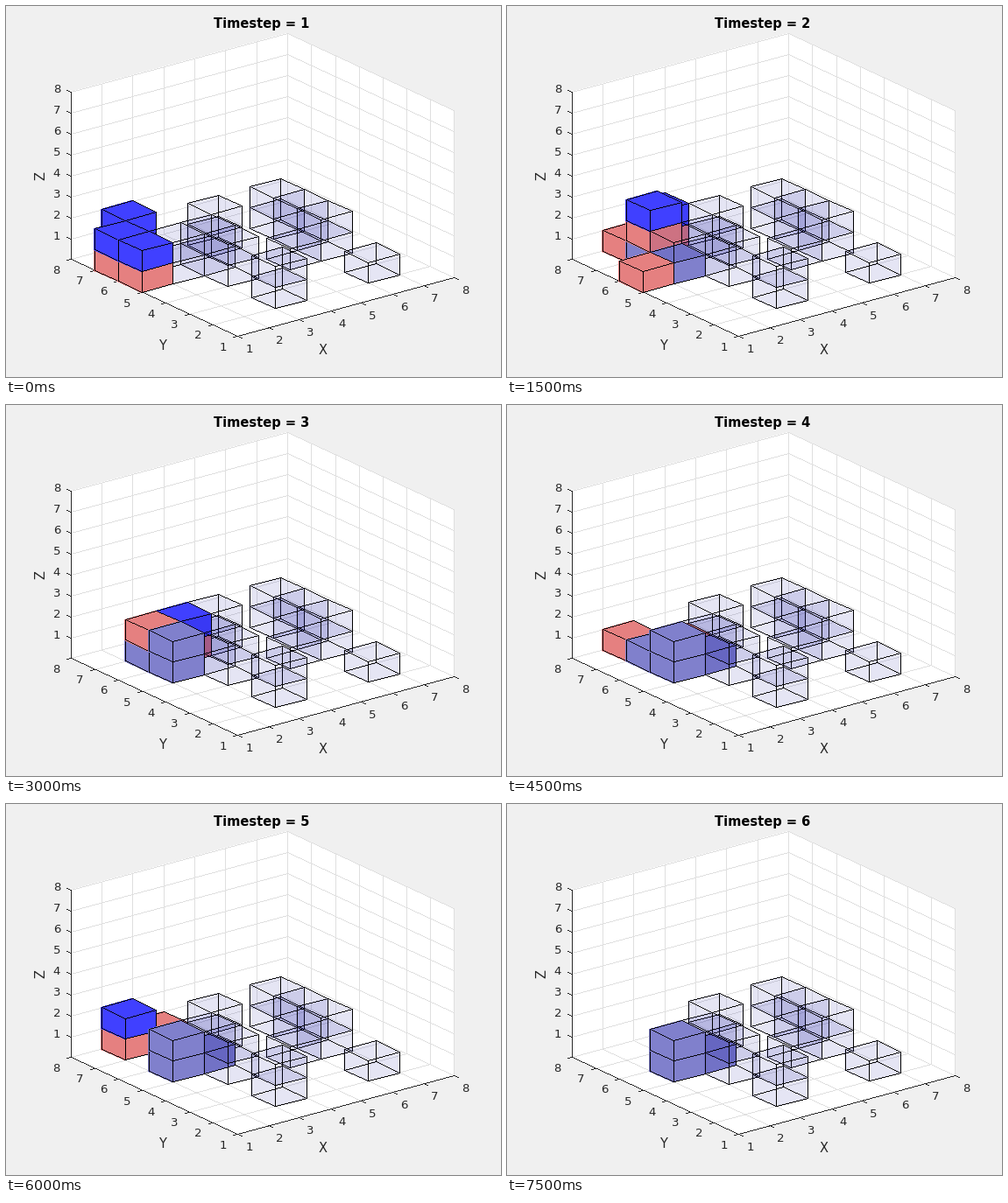
Write a matplotlib script that moves like this. It is 565 px wide and 424 px high and loops after 8 s.

```python
import numpy as np
import matplotlib.pyplot as plt
from matplotlib.animation import FuncAnimation

W, H, DPI = 565, 424, 80
INK = (38 / 255,) * 3
GRID = (223 / 255,) * 3

# Orthographic view, azimuth -37.5, elevation 30, stretched to the axes box
AZ, EL = np.radians(37.5), np.radians(30)
C, S = np.cos(AZ), np.sin(AZ)
LEFT, BOTTOM = 73, 0.89 * H
WIDE = 0.775 * W / (C + S)
TALL = 0.815 * H / ((C + S) * np.sin(EL) + np.cos(EL))
X_VEC = np.array([WIDE * C, -TALL * S * np.sin(EL)]) / 7
Y_VEC = np.array([-WIDE * S, -TALL * C * np.sin(EL)]) / 7
Z_VEC = np.array([0, -TALL * np.cos(EL)]) / 8
ORIGIN = np.array([LEFT + WIDE * S, BOTTOM])


def pixel(x, y, z):
    spot = ORIGIN + (x - 1) * X_VEC + (y - 1) * Y_VEC + z * Z_VEC
    return np.floor(spot) + 0.5


def towers(heights, first_y):
    """Cells of a height map: one word per x from 1, one digit per y."""
    return {(i, j, k)
            for i, row in enumerate(heights.split(), 1)
            for j, height in enumerate(row, first_y)
            for k in range(int(height))}


GOAL = towers("00000 00020 20220 00002 00100 10222", first_y=2)
SETTLED = GOAL | {(2, 6, 0)}
STEPS = [towers(plan, first_y=5) for plan in (
    "220 002 000", "100 131 002", "000 220 020",
    "000 211 110", "000 202 101", "000 200 100")]

RED = (229 / 255, 128 / 255, 128 / 255)
SLATE = (128 / 255, 128 / 255, 204 / 255)
BLUE = (64 / 255, 64 / 255, 1)
GHOST = (0, 0, 0.6, 0.1)


def block_color(cell, blocks):
    """Settled blocks are slate, blocks riding on a loose one are blue."""
    i, j, k = cell
    below = (i, j, k - 1)
    if cell in SETTLED:
        return SLATE
    return BLUE if below in blocks and below not in SETTLED else RED


fig = plt.figure(figsize=(W / DPI, H / DPI), dpi=DPI, facecolor=(240 / 255,) * 3)
ax = fig.add_axes([0, 0, 1, 1])
ax.set_xlim(0, W)
ax.set_ylim(H, 0)
ax.axis("off")


def trace(a, b):
    """Pixel centres along a hard-edged line."""
    count = int(np.abs(b - a).max()) + 1
    return np.floor(np.linspace(a, b, count)) + 0.5


def lines(pairs, color, z):
    dots = np.vstack([trace(a, b) for a, b in pairs])
    return ax.plot(*dots.T, ",", color=color, zorder=z)[0]


def area(points, color, z):
    return ax.fill(*np.array(points).T, facecolor=color, edgecolor="none",
                   lw=0, zorder=z, antialiased=False)[0]


def label(x, y, text, size, color=INK, va="baseline", **kw):
    return ax.text(x, y, text, fontsize=size * 96 / DPI, color=color, ha="center",
                   va=va, family="DejaVu Sans", zorder=900, **kw)


def draw_box():
    area([pixel(1, 8, 8), pixel(8, 8, 8), pixel(8, 1, 8),
          pixel(8, 1, 0), pixel(1, 1, 0), pixel(1, 8, 0)], "white", 0)
    grid = []
    for t in range(1, 9):
        for path in ([(t, 1, 0), (t, 8, 0), (t, 8, 8)],
                     [(1, t, 0), (8, t, 0), (8, t, 8)],
                     [(1, 8, t), (8, 8, t), (8, 1, t)]):
            a, b, c = (pixel(*p) for p in path)
            grid += [(a, b), (b, c)]
    lines(grid, GRID, 1)

    near, far = pixel(1, 1, 0), pixel(1, 8, 0)
    rules = [(near, pixel(8, 1, 0)), (near, far), (far, pixel(1, 8, 8))]
    out_x = -Y_VEC / np.hypot(*Y_VEC) * 5
    out_y = -X_VEC / np.hypot(*X_VEC) * 5
    for t in range(1, 9):
        for spot, tick, shift in (((t, 1, 0), out_x, (14, 18.6)),
                                  ((1, t, 0), out_y, (-16, 16)),
                                  ((1, 8, t), -out_x, (-15.5, 0.3))):
            p = pixel(*spot)
            rules.append((p, np.floor(p + tick) + 0.5))
            label(*(p + shift), str(t), 10)
    lines(rules, INK, 2)
    label(362, 398, "X", 11)
    label(178.5, 393, "Y", 11)
    label(39.5, 193.8, "Z", 11, va="center", rotation=90)


def draw_cube(cell, color, z, solid):
    v = {d: pixel(*np.add(cell, d)) for d in np.ndindex(2, 2, 2)}
    rim = [(0, 1, 0), (0, 0, 0), (1, 0, 0), (1, 0, 1), (1, 1, 1), (0, 1, 1)]
    hidden = (1, 1, 0)
    edges = [(v[p], v[q]) for p in v for q in v
             if p < q and np.abs(np.subtract(p, q)).sum() == 1
             and not (solid and hidden in (p, q))]
    return [area([v[p] for p in rim], color, z), lines(edges, "black", z + 0.5)]


draw_box()
title = label(291.5, 25, "", 11, "black", weight="bold")
live = []


def update(n):
    step = n // 3
    while live:
        live.pop().remove()
    title.set_text(f"Timestep = {step + 1}")
    blocks = STEPS[step]
    # back to front, bottom to top
    order = sorted(GOAL | blocks, key=lambda c: (-c[1], -c[0], c[2]))
    for rank, cell in enumerate(order):
        solid = cell in blocks
        color = block_color(cell, blocks) if solid else GHOST
        live.extend(draw_cube(cell, color, 10 + rank, solid))
    return [title] + live


anim = FuncAnimation(fig, update, frames=16, interval=500, repeat=True,
                     repeat_delay=0, init_func=lambda: update(0), blit=False)
plt.show()
```
